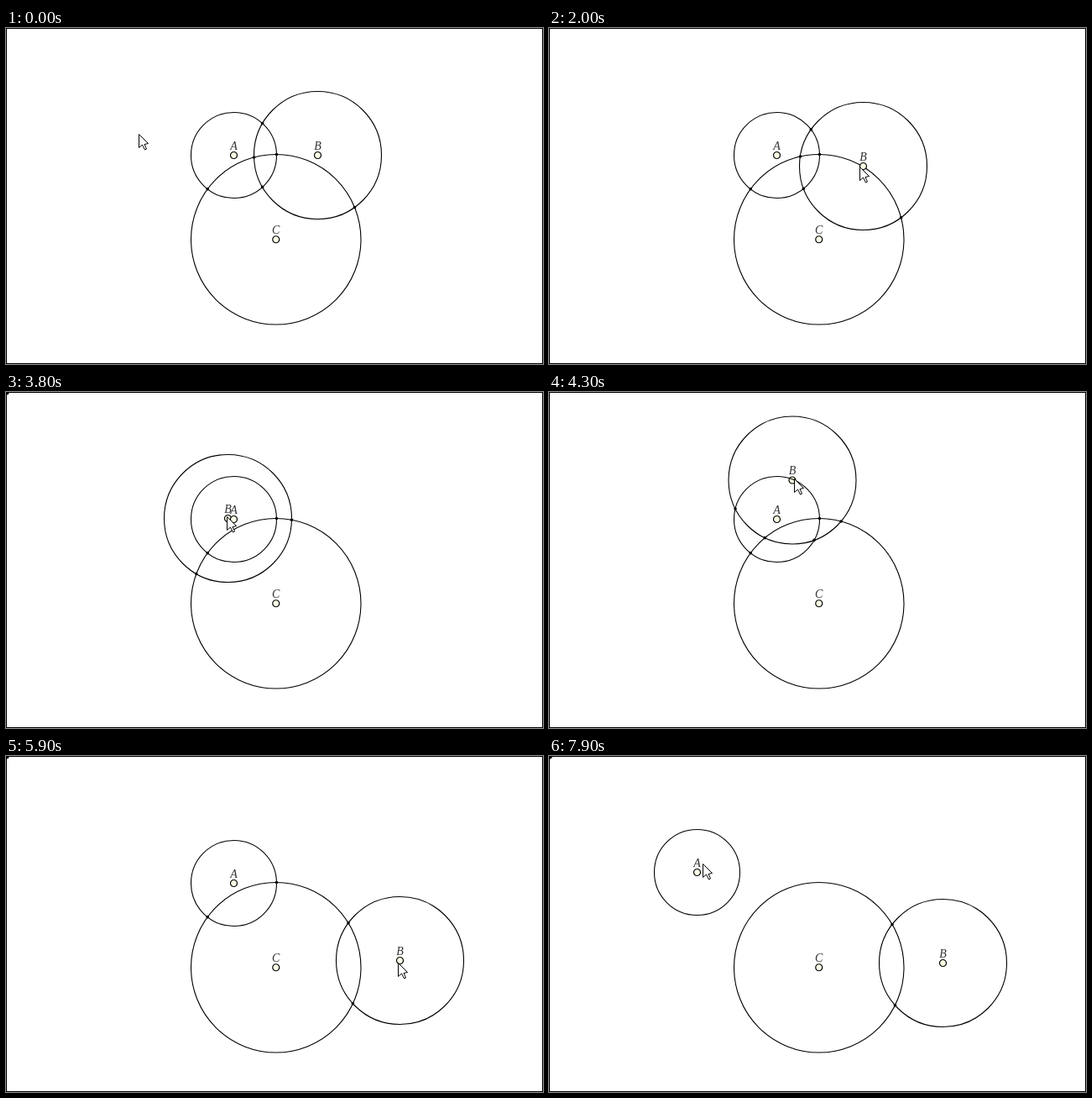
An HTML page for the animation above (8000 ms loop, 640x400 px).

```html
<!DOCTYPE html>
<html lang="en">
<head>
<meta charset="utf-8">
<title>Three circles</title>
<style>
  html, body { margin: 0; width: 100%; height: 100%; overflow: hidden; background: #fff; }
  svg { display: block; width: 640px; height: 400px; }
  .line { fill: none; stroke: #000; stroke-width: 1.1; }
  .center { fill: #ffffe6; stroke: #000; stroke-width: 1.2; }
  text { font: italic 14px "Liberation Serif", "Times New Roman", serif; fill: #333; text-anchor: middle; }
  #pointer { fill: #fff; stroke: #000; stroke-width: 1; }
</style>
</head>
<body>
<svg viewBox="0 0 640 400">
  <g id="C"><circle class="line" r="101.25"/><circle class="center" r="4"/><text y="-7">C</text></g>
  <g id="B"><circle class="line" r="76"/><circle class="center" r="4"/><text y="-7">B</text></g>
  <g id="A"><circle class="line" r="51"/><circle class="center" r="4"/><text y="-7">A</text></g>
  <g id="dots"></g>
  <rect class="line" x=".5" y=".5" width="639" height="399" style="stroke-width:1"/>
  <path id="pointer" d="M.5 .5V16.5L4.5 13L7.5 19L9.5 18L7 12.5L11.5 11.5Z"/>
</svg>
<script>
const LOOP = 8000, STEP = 100, LAG = 25;
const GRAB_B = 900, DROP_B = 6350, GRAB_A = 6900;
const names = ['A', 'B', 'C'], pairs = ['AB', 'AC', 'BC'];
const entry = [158.5, 126.5], homeC = [321.75, 251.75];

// Turning points of the two drags: ms, x, y
const dragB = [
  [1500, 371.5, 151.5], [2000, 374.5, 164.5], [2450, 246, 172], [2900, 326.5, 187.5],
  [3800, 264.5, 150.5], [4300, 290, 105], [4900, 370.5, 74.5], [5400, 559, 105],
  [5900, 469.5, 243.5], [DROP_B, 469.5, 246.5]
];
const dragA = [
  [GRAB_A, 271.5, 151.5], [7500, 154, 232], [7900, 176.5, 138.5], [8300, 350, -55]
];

const byId = id => document.getElementById(id);
const place = (el, [x, y]) => el.setAttribute('transform', `translate(${x} ${y})`);
const clamp = u => Math.min(1, Math.max(0, u));
const smooth = u => u * u * (3 - 2 * u);

// Catmull-Rom spline over timed points, at rest at both ends
function spline(keys, t) {
  const next = keys.findIndex(key => key[0] > t);
  if (next < 1) return keys.at(next).slice(1);
  const i = next - 1, a = keys[i], b = keys[next];
  const span = b[0] - a[0], u = (t - a[0]) / span, v = 1 - u;
  const speed = (j, k) => {
    const p = keys[j - 1], q = keys[j + 1];
    return p && q ? span * (q[k] - p[k]) / (q[0] - p[0]) : 0;
  };
  return [1, 2].map(k => a[k] + (b[k] - a[k]) * smooth(u)
    + u * v * (v * speed(i, k) - u * speed(next, k)));
}

// Eased pointer move, optionally arching upwards
function reach(from, to, u, lift) {
  const e = smooth(clamp(u));
  const [x, y] = from.map((v, i) => v + (to[i] - v) * e);
  return [x, y - lift * Math.sin(Math.PI * e)];
}

// The pointer runs slightly ahead of whatever it drags
function pointerAt(t) {
  if (t < GRAB_B) return reach(entry, spline(dragB, 0), t / GRAB_B, 67);
  if (t < DROP_B) return spline(dragB, t + LAG);
  if (t < GRAB_A) {
    return reach(spline(dragB, DROP_B), spline(dragA, 0), (t - DROP_B) / (GRAB_A - DROP_B), 0);
  }
  return spline(dragA, t + LAG);
}

// A missing crossing falls back to the stage corner
function crossings(p, r, q, s) {
  const dx = q[0] - p[0], dy = q[1] - p[1], d = Math.hypot(dx, dy);
  if (d > r + s || d < Math.abs(r - s)) return [[1.5, 1.5], [1.5, 1.5]];
  const along = (d * d + r * r - s * s) / (2 * d);
  const side = Math.sqrt(Math.max(0, r * r - along * along));
  return [side, -side].map(h => [
    p[0] + (along * dx - h * dy) / d,
    p[1] + (along * dy + h * dx) / d
  ]);
}

const radius = Object.fromEntries(
  names.map(name => [name, byId(name).querySelector('.line').r.baseVal.value]));

const dots = Array.from({ length: 2 * pairs.length }, () => {
  const dot = document.createElementNS('http://www.w3.org/2000/svg', 'circle');
  dot.setAttribute('r', 1.8);
  return byId('dots').appendChild(dot);
});

function draw(t) {
  const at = { A: spline(dragA, t), B: spline(dragB, t), C: homeC };
  names.forEach(name => place(byId(name), at[name]));
  pairs.flatMap(([m, n]) => crossings(at[m], radius[m], at[n], radius[n]))
    .forEach((point, i) => place(dots[i], point));
  place(byId('pointer'), pointerAt(t).map(Math.floor));
}

const start = performance.now();
function tick() {
  const t = (performance.now() - start) % LOOP;
  draw(Math.floor(t / STEP) * STEP);
  requestAnimationFrame(tick);
}
tick();
</script>
</body>
</html>
```
